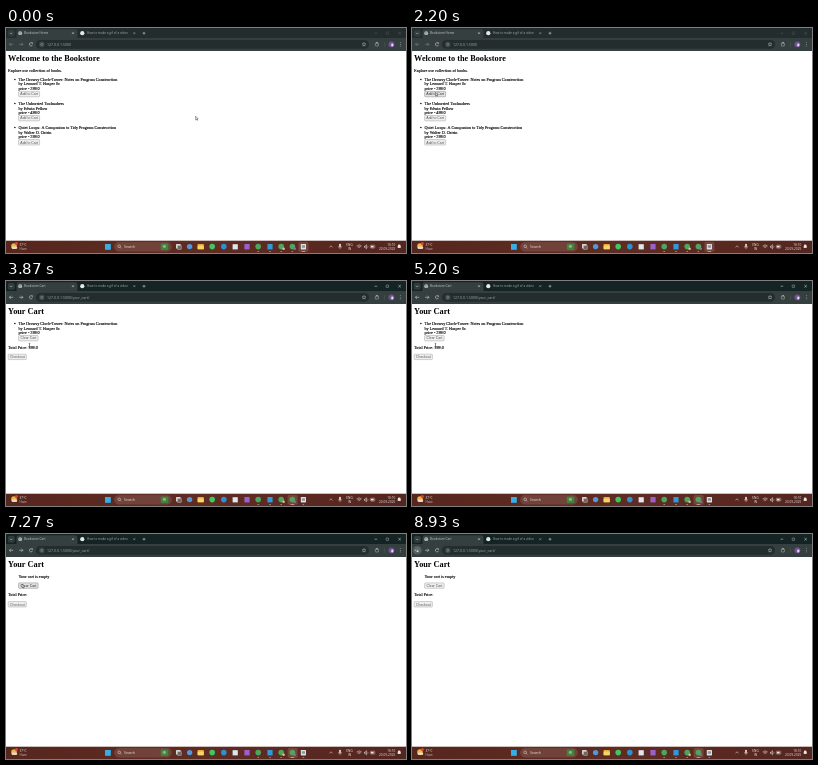
Recreate the animation shown at these times as an HTML page with a canvas. Size 400 px wide and 225 px high, loop 9 s.

```html
<!DOCTYPE html>
<html lang="en">
<head>
<meta charset="utf-8">
<title>Bookstore demo</title>
<style>
html, body { margin: 0; width: 100%; height: 100%; overflow: hidden; background: #fff; }
canvas { display: block; width: 100vw; height: 100vh; }
</style>
</head>
<body>
<canvas id="stage"></canvas>
<script>
const W = 400, H = 225, LOOP = 9000;
const TO_CART = 2500, CLEARED = 6000, BACK_HOVER = 7900;
const SERIF = '"Liberation Serif", "Times New Roman", serif';
const SANS = '"Liberation Sans", Arial, sans-serif';
const UI = '"Open Sans", "Noto Sans", sans-serif';
const canvas = document.getElementById('stage');
const ctx = canvas.getContext('2d');

const books = [
  ['The Drowsy Clock-Tower: Notes on Program Construction', 'Leonard T. Hasper Sr.', 299],
  ['The Unhurried Toolmakers', 'Edwin Pellow', 499],
  ['Quiet Loops: A Companion to Tidy Program Construction', 'Walter D. Ostrin', 299]
];

// Pointer keys: time, x, y of the tip
const path = [
  [0, 189.6, 88.2], [700, 189.6, 88.2], [1800, 23.5, 64.2], [5660, 23.5, 64.2],
  [5900, 22, 56.2], [6700, 22, 56.2], [7300, 16, 50], [7550, 15, 48],
  [7900, 4.8, 15.4], [LOOP, 4.8, 15.4]
];

function pointer(t) {
  const i = path.findIndex((p, n) => n > 0 && t <= p[0]);
  const [t0, x0, y0] = path[i - 1], [t1, x1, y1] = path[i];
  const u = (t - t0) / (t1 - t0), e = u * u * (3 - 2 * u);
  return [x0 + (x1 - x0) * e, y0 + (y1 - y0) * e];
}

function text(s, x, y, size, color = '#000', family = SERIF, weight = 400, align = 'left') {
  // Set type large and scale down for even spacing
  const k = size / 16;
  ctx.save();
  ctx.translate(x, y);
  ctx.scale(k, k);
  ctx.font = `${weight} 16px ${family}`;
  ctx.textAlign = align;
  ctx.fillStyle = color;
  ctx.fillText(s, 0, 0);
  if (family === SERIF && weight === 400) {
    ctx.strokeStyle = color;
    ctx.lineWidth = 0.45;
    ctx.strokeText(s, 0, 0);
  }
  ctx.restore();
}

function rect(x, y, w, h, color) {
  ctx.fillStyle = color;
  ctx.fillRect(x, y, w, h);
}

function round(x, y, w, h, r, fill, stroke) {
  ctx.beginPath();
  ctx.roundRect(x, y, w, h, r);
  if (fill) { ctx.fillStyle = fill; ctx.fill(); }
  if (stroke) { ctx.strokeStyle = stroke; ctx.lineWidth = 0.4; ctx.stroke(); }
}

function dot(x, y, r, color) {
  ctx.beginPath();
  ctx.arc(x, y, r, 0, 7);
  ctx.fillStyle = color;
  ctx.fill();
}

function ring(x, y, r, color, width = 0.5, from = 0, to = Math.PI * 2) {
  ctx.beginPath();
  ctx.arc(x, y, r, from, to);
  ctx.strokeStyle = color;
  ctx.lineWidth = width;
  ctx.stroke();
}

function line(points, color, width = 0.55) {
  ctx.beginPath();
  points.forEach(([x, y]) => ctx.lineTo(x, y));
  ctx.strokeStyle = color;
  ctx.lineWidth = width;
  ctx.stroke();
}

function cross(x, y, r, color) {
  line([[x - r, y - r], [x + r, y + r]], color);
  line([[x - r, y + r], [x + r, y - r]], color);
}

function button(label, x, y, w, hover) {
  round(x, y, w, 5.4, 0.8, hover ? '#e2e2e2' : '#efefef', hover ? '#666' : '#8c8c8c');
  text(label, x + w / 2, y + 3.9, 3.47, hover ? '#333' : '#555', SANS, 400, 'center');
}

function arrowIcon(x, y, dir, color) {
  line([[x - 1.9, y], [x + 1.9, y]], color);
  line([[x + dir * 0.3, y - 1.6], [x + dir * 1.9, y], [x + dir * 0.3, y + 1.6]], color);
}

// The window gains focus when the cart opens
function browser(cart, backHover) {
  const ink = '#d5dada', dim = '#a3abab', faint = '#59625f';
  const control = cart ? ink : faint, nav = cart ? ink : '#858d8d';
  rect(0, 0, W, 11, cart ? '#142323' : '#232d2d');
  rect(0, 10, W, 13, '#363f3f');
  round(1.8, 1.8, 7, 7, 2, '#303b3b');
  line([[4, 4.8], [5.2, 6], [6.4, 4.8]], ink);
  round(10.5, 1.3, 61, 12, 2.4, '#363f3f');
  dot(14.2, 5.2, 1.9, '#c3caca');
  ring(14.2, 5.2, 1, '#4a5353', 0.4);
  text(cart ? 'Bookstore Cart' : 'Bookstore Home', 18, 6.3, 3.1, '#c3caca', UI);
  cross(67, 5.2, 0.9, ink);
  dot(76.3, 5.2, 2.1, '#e5e9e7');
  text('How to make a gif of a video', 81, 6.3, 3.1, dim, UI);
  cross(128.3, 5.2, 0.9, dim);
  line([[136.6, 5.2], [139.4, 5.2]], ink);
  line([[138, 3.8], [138, 6.6]], ink);
  line([[368.6, 5.2], [371.2, 5.2]], control);
  round(380.2, 4, 2.4, 2.4, 0.3, null, control);
  cross(393.6, 5.2, 1.2, control);

  if (backHover) dot(5.3, 16.3, 4.3, '#596262');
  arrowIcon(5.3, 16.3, -1, nav);
  arrowIcon(15, 16.3, 1, nav);
  ring(25, 16.3, 1.6, ink, 0.55, 0.3, 5.5);
  rect(25.7, 14.6, 1.1, 1, ink);
  round(30, 12, 333, 8.8, 4.4, '#232d2d');
  dot(35.8, 16.4, 2.8, '#3b4545');
  ring(35.8, 16.4, 1.1, dim, 0.5);
  text('127.0.0.1:5000' + (cart ? '/your_cart/' : ''), 41, 17.7, 3.55, dim, UI);

  ctx.beginPath();
  for (let i = 0; i < 10; i++) {
    const a = i * Math.PI / 5 - Math.PI / 2, r = i % 2 ? 0.9 : 2;
    ctx.lineTo(358 + r * Math.cos(a), 16.4 + r * Math.sin(a));
  }
  ctx.closePath();
  ctx.strokeStyle = ink;
  ctx.lineWidth = 0.4;
  ctx.stroke();
  round(369.4, 15, 3, 3, 0.4, null, ink);
  dot(371, 14.8, 0.7, ink);
  line([[378.4, 14], [378.4, 19]], '#596262', 0.4);
  dot(385.4, 16.3, 2.9, '#72509a');
  round(385.2, 15.4, 2.2, 3, 1, '#e3dbe8');
  for (const y of [14.7, 16.3, 17.9]) dot(394.3, y, 0.4, ink);
}

function bookItem([title, author, price], y) {
  dot(8.9, y - 1.2, 0.75, '#000');
  text(title, 12.5, y, 4.17);
  text('by ' + author, 12.5, y + 4.8, 4.17);
  text(`price - ${price}.0`, 12.5, y + 9.6, 4.17);
}

function heading(s) {
  text(s, 2.1, 32.5, 8.25, '#000', SERIF, 700);
}

function homePage(hover) {
  heading('Welcome to the Bookstore');
  text('Explore our collection of books.', 2.1, 43.6, 4.17);
  books.forEach((book, i) => {
    const y = 52.6 + i * 24.1;
    bookItem(book, y);
    button('Add to Cart', 12.6, y + 10.8, 21, hover && i === 0);
  });
}

function cartPage(empty, hover) {
  heading('Your Cart');
  if (empty) text('Your cart is empty', 12.5, 43.8, 4.17);
  else bookItem(books[0], 43.8);
  const shift = empty ? -5.6 : 0;
  button('Clear Cart', 12.6, 54.5 + shift, 19.5, hover);
  text('Total Price:' + (empty ? '' : ` ${books[0][2]}.0`), 2.1, 67.9 + shift, 4.17);
  button('Checkout', 2.2, 73.2 + shift, 18.2, false);
}

function taskbar(cart) {
  const ink = '#efe6e3';
  const g = ctx.createLinearGradient(0, 0, W, 0);
  g.addColorStop(0, '#56271f');
  g.addColorStop(0.5, '#5f2c22');
  g.addColorStop(1, '#542620');
  rect(0, 212.7, W, 13, g);

  dot(8, 218, 2.8, '#f3b43c');
  round(5.6, 218.6, 5.6, 2.4, 1.2, '#e8d9c6');
  dot(10.4, 215.6, 1.5, '#d9433a');
  text('37°C', 13.6, 217.5, 3.1, ink, UI);
  text('Haze', 13.6, 222, 3.1, '#cdbab5', UI);

  rect(99, 216, 5.8, 5.8, '#36aee8');
  round(108.5, 214.2, 57, 9, 4.5, '#70423a', '#7b5047');
  ring(113.2, 218.3, 1.3, ink);
  line([[114.1, 219.3], [115.1, 220.4]], ink);
  text('Search', 118, 220, 3.5, ink, UI);
  round(154.8, 215.4, 7.6, 6.6, 1, '#3f8445');
  dot(158.4, 218.3, 1.6, '#8fb95f');

  round(cart ? 281.6 : 292.4, 214, 10, 9.8, 1.5, '#764439');

  round(170, 216, 4.6, 4.6, 0.5, '#d8d4d2');
  round(171.4, 217.4, 4, 4, 0.5, '#6e6562', '#d8d4d2');
  dot(183.6, 218.6, 2.7, '#5397d7');
  round(191.6, 216, 6.2, 5.2, 0.6, '#e6ac35');
  round(191.6, 217.4, 6.2, 3.8, 0.5, '#f8d467');
  dot(206.2, 218.6, 2.8, '#3dc765');
  dot(217.8, 218.6, 2.8, '#2c91d2');
  rect(226.6, 216.2, 5.2, 5.2, '#dce8ee');
  rect(238.4, 216, 5.2, 5.4, '#9861cc');
  dot(252.2, 218.6, 2.8, '#4ca65c');
  rect(261.4, 216, 5.2, 5.4, '#3198dc');
  dot(275.2, 218.6, 2.8, '#4ca65c');
  dot(286.4, 218.6, 2.8, '#4ca65c');
  dot(277.6, 220.8, 1.3, '#d7bd9c');
  dot(288.8, 220.8, 1.3, '#8b68b1');
  round(294.8, 216, 5.2, 5.4, 0.6, '#dfe2e4');
  round(295.8, 217.2, 3.2, 2.6, 0.3, '#8296a5');
  for (const x of [252.2, 264, 275.2, 286.4, 297.4]) {
    const active = x === (cart ? 286.4 : 297.4);
    const w = active ? 4 : 1.8;
    round(x - w / 2, 223.2, w, 0.7, 0.35, active ? '#f0a58f' : '#bda49e');
  }

  line([[323.5, 219.2], [325, 217.8], [326.5, 219.2]], ink);
  round(333.2, 215.8, 1.6, 3.4, 0.8, ink);
  ring(334, 218.2, 1.7, ink, 0.4, 0, Math.PI);
  line([[334, 219.9], [334, 221.2]], ink, 0.4);
  text('ENG', 343.5, 217.6, 3.1, ink, UI, 400, 'center');
  text('IN', 343.5, 222, 3.1, ink, UI, 400, 'center');
  for (const r of [1.2, 2.4, 3.6]) ring(353.2, 220.6, r, ink, 0.5, -2.35, -0.8);
  rect(358.3, 217.9, 1, 1.8, ink);
  line([[359.2, 217.9], [360.5, 216.7], [360.5, 220.9], [359.2, 219.7]], ink, 0.5);
  ring(360.6, 218.8, 1.3, ink, 0.4, -0.9, 0.9);
  round(364.4, 217.2, 4.4, 2.9, 0.6, null, ink);
  rect(365, 217.8, 2.7, 1.7, ink);
  text('18:10', 389.2, 217.6, 3.1, ink, UI, 400, 'right');
  text('20-09-2025', 389.2, 222, 3.1, ink, UI, 400, 'right');
  dot(393.2, 218, 1.4, ink);
  rect(391.7, 218.2, 3, 1.7, ink);
}

function drawPointer(x, y, overText) {
  if (overText) {
    line([[x, y - 1.7], [x, y + 2.3]], '#111', 0.5);
    for (const dy of [-1.8, 2.4]) line([[x - 0.8, y + dy], [x + 0.8, y + dy]], '#111', 0.4);
    return;
  }
  ctx.beginPath();
  for (const [dx, dy] of [[0, 0], [0, 3.7], [0.85, 2.95], [1.4, 4.2], [1.95, 3.95], [1.4, 2.7], [2.55, 2.65]]) {
    ctx.lineTo(x + dx, y + dy);
  }
  ctx.closePath();
  ctx.fillStyle = '#fff';
  ctx.fill();
  ctx.strokeStyle = '#111';
  ctx.lineWidth = 0.4;
  ctx.stroke();
}

function draw(t) {
  const cart = t >= TO_CART, empty = t >= CLEARED;
  const [x, y] = pointer(t);
  rect(0, 0, W, H, '#fff');
  browser(cart, t >= BACK_HOVER - 40);
  if (cart) cartPage(empty, t >= 5800 && t < 7600);
  else homePage(t >= 1780);
  taskbar(cart);
  drawPointer(x, y, cart && t < 5700);
}

function frame(now) {
  const k = window.devicePixelRatio || 1;
  const w = Math.round(innerWidth * k), h = Math.round(innerHeight * k);
  if (canvas.width !== w || canvas.height !== h) {
    canvas.width = w;
    canvas.height = h;
  }
  ctx.setTransform(w / W, 0, 0, h / H, 0, 0);
  draw(now % LOOP);
  requestAnimationFrame(frame);
}
requestAnimationFrame(frame);
</script>
</body>
</html>
```
